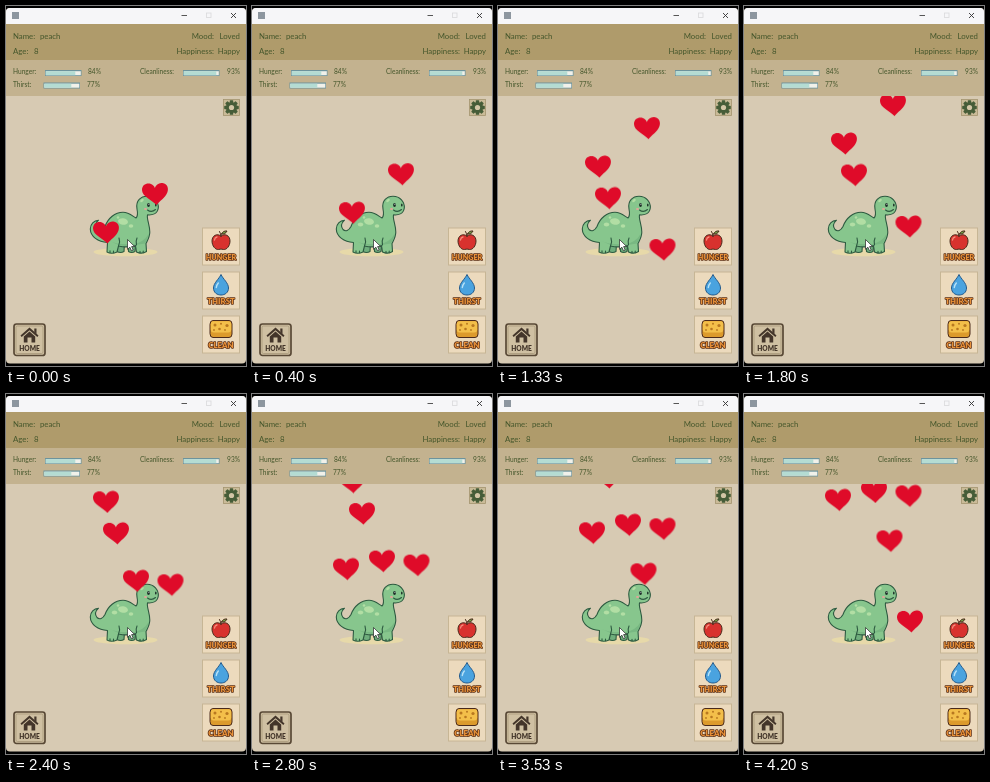
Animation of 240x360 px, one loop 4270 ms. Source, as an HTML page:

```html
<!DOCTYPE html>
<html lang="en">
<head>
<meta charset="utf-8">
<title>Virtual pet</title>
<style>
html, body { margin: 0; width: 100%; height: 100%; overflow: hidden; background: #000; }
svg { display: block; width: 100%; height: 100%; }
text { font-family: Lato, "Open Sans", sans-serif; fill: #44562b; }
.big { font-size: 7.8px; }
.small { font-size: 6.6px; }
.end { text-anchor: end; }
.label { font-weight: 900; text-anchor: middle; fill: #e9923a; stroke: #5b2e14; stroke-width: 1.5px; paint-order: stroke; stroke-linejoin: round; }
.line { stroke: #2d5a40; stroke-width: 1.1px; stroke-linejoin: round; stroke-linecap: round; }
.ink { stroke: #4a2a1c; stroke-width: 1px; stroke-linejoin: round; stroke-linecap: round; }

/* All hearts rise together; each one pops in at its own moment. */
.rise { animation: rise 4270ms steps(64) -6ms infinite; }
@keyframes rise { to { transform: translateY(-210.9px); } }
.pop { animation: 4270ms step-end infinite; }
.p1 { animation-name: pop1; }
.p2 { animation-name: pop2; }
.p3 { animation-name: pop3; }
.p4 { animation-name: pop4; }
.p5 { animation-name: pop5; }
.p6 { animation-name: pop6; }
@keyframes pop1 { 0% { opacity: 0; } 14.05%, to { opacity: 1; } }
@keyframes pop2 { 0% { opacity: 0; } 28.8%, to { opacity: 1; } }
@keyframes pop3 { 0% { opacity: 0; } 43.55%, to { opacity: 1; } }
@keyframes pop4 { 0% { opacity: 0; } 58.3%, to { opacity: 1; } }
@keyframes pop5 { 0% { opacity: 0; } 73.05%, to { opacity: 1; } }
@keyframes pop6 { 0% { opacity: 0; } 87.8%, to { opacity: 1; } }
</style>
</head>
<body>
<svg viewBox="0 0 240 360" preserveAspectRatio="none">
  <defs>
    <path id="heart" fill="#df0b29" d="M1.5 11.5C-3 6.500-13 3-13-3.500C-13-9-8-11-4-9.500C-2-8.800-.5-7-.2-5.500C1-8.800 4-11.200 7.500-10.500C12.500-9.800 14-5 12.300-1C10 4.500 5 7 1.500 11.500Z"/>
    <g id="bar">
      <rect width="36.500" height="6" fill="#6d939c"/>
      <rect x=".8" y="1.200" width="35" height="4" fill="#f1f1ea"/>
    </g>
    <rect id="card" x="196.500" y="0" width="37" height="37" fill="#ecdabd" stroke="#c7b695" stroke-width="1"/>
    <rect id="tooth" x="-1.700" y="-7.300" width="3.400" height="14.600" rx=".6"/>
    <clipPath id="yard"><rect y="90" width="240" height="267"/></clipPath>
  </defs>

  <!-- window -->
  <rect width="240" height="360" fill="#000"/>
  <rect y="2" width="240" height="355.500" rx="4" fill="#d7cab3"/>
  <path d="M0 18V6Q0 2 4 2H236Q240 2 240 6V18Z" fill="#f6f6f8"/>
  <rect x="6" y="6" width="7" height="7" fill="#8d969f"/>
  <g fill="none" stroke-width=".9">
    <path d="M175.500 9.500H181" stroke="#444"/>
    <rect x="200.500" y="7" width="4.500" height="4.500" stroke="#dcdcde"/>
    <path d="M225 7L230 12M230 7L225 12" stroke="#333"/>
  </g>

  <!-- status -->
  <rect y="18" width="240" height="36.500" fill="#af9b6b"/>
  <rect y="54" width="240" height="36" fill="#c3b28f"/>
  <g class="big">
    <text x="7" y="33">Name:</text><text x="34" y="33">peach</text>
    <text x="7" y="47.500">Age:</text><text x="28" y="47.500">8</text>
    <text class="end" x="208" y="33">Mood:</text><text class="end" x="234" y="33">Loved</text>
    <text class="end" x="208" y="47.500">Happiness:</text><text class="end" x="234" y="47.500">Happy</text>
  </g>
  <g class="small">
    <text x="7" y="68">Hunger:</text><text x="82" y="68">84%</text>
    <text x="7" y="81">Thirst:</text><text x="81" y="81">77%</text>
    <text class="end" x="168" y="68">Cleanliness:</text><text class="end" x="234" y="68">93%</text>
  </g>
  <use href="#bar" x="39" y="64"/><rect x="39.800" y="65.200" width="29.500" height="4" fill="#b4dcd3"/>
  <use href="#bar" x="37.500" y="76.500"/><rect x="38.300" y="77.700" width="27" height="4" fill="#b4dcd3"/>
  <use href="#bar" x="177" y="64"/><rect x="177.800" y="65.200" width="32.500" height="4" fill="#b4dcd3"/>

  <!-- settings -->
  <rect x="217.500" y="93.500" width="16" height="16" fill="#cabb98" stroke="#a3956f" stroke-width=".8"/>
  <g transform="translate(225.500 101.500)" fill="#465d38">
    <use href="#tooth"/><use href="#tooth" transform="rotate(45)"/>
    <use href="#tooth" transform="rotate(90)"/><use href="#tooth" transform="rotate(135)"/>
    <circle r="5.600"/><circle r="2.600" fill="#d3c6a6"/>
  </g>

  <!-- hunger -->
  <use href="#card" y="222"/>
  <path class="ink" fill="#d8322e" d="M215 230C211 227 206 229.500 206 235C206 240 209.500 244 212.500 243.500Q215 242.600 217.500 243.500C220.500 244 224 240 224 235C224 229.500 219 227 215 230Z"/>
  <path d="M208.500 234Q208.700 231.500 211 231" fill="none" stroke="#f58d7c" stroke-width="1.300" stroke-linecap="round"/>
  <path class="ink" d="M215 230Q214.800 227.500 213.500 225.500" fill="none"/>
  <path class="ink" stroke-width=".7" fill="#6fa545" d="M215.500 228Q217 224.500 221 225Q219.500 228.500 215.500 228Z"/>
  <text class="label" x="215" y="253.500" font-size="7.200">HUNGER</text>

  <!-- thirst -->
  <use href="#card" y="266"/>
  <path d="M215 268.500C217 273 222.500 277 222.500 282C222.500 286.500 219 289 215 289C211 289 207.500 286.500 207.500 282C207.500 277 213 273 215 268.500Z" fill="#4aa3df" stroke="#245a8c"/>
  <path d="M210.300 281.500Q210.600 279 212.300 277" fill="none" stroke="#b8e2f7" stroke-width="1.400" stroke-linecap="round"/>
  <text class="label" x="215" y="298" font-size="7.800">THIRST</text>

  <!-- clean -->
  <use href="#card" y="310"/>
  <path class="ink" fill="#dc9a2c" d="M204 318Q204 314.500 207 314.500H223Q226 314.500 226 318V328Q226 331.500 223 331.500H207Q204 331.500 204 328Z"/>
  <path fill="#f3bf4a" d="M204.800 318Q205 315.200 207.500 315.200H222.500Q225.200 315.200 225.200 318V324Q225 326.500 222.500 326.500H207.500Q205 326.500 204.800 324Z"/>
  <g fill="#b87820">
    <circle cx="209" cy="319" r="1.500"/><circle cx="215" cy="317.800" r="1"/><circle cx="221" cy="319.500" r="1.600"/>
    <circle cx="213.500" cy="323" r="1.300"/><circle cx="219" cy="324" r=".9"/><circle cx="208" cy="324" r=".9"/>
  </g>
  <text class="label" x="215" y="341.500" font-size="7.800">CLEAN</text>

  <!-- home -->
  <rect x="8" y="318" width="31" height="31.500" rx="2.500" fill="#cfc0a2" stroke="#594936" stroke-width="1.700"/>
  <rect x="10" y="320" width="27" height="27.500" rx="1.500" fill="none" stroke="#9d8c6d" stroke-width=".6"/>
  <g fill="#43352a">
    <path d="M23.500 321.500L32.500 329.500L31.300 331L23.500 324.200L15.700 331L14.500 329.500Z"/>
    <path d="M28.300 322.500H30.500V328L28.300 326Z"/>
    <path d="M17.800 330.500L23.500 325.500L29.200 330.500V336.500H25.500V331.500H21.500V336.500H17.800Z"/>
  </g>
  <text x="23.500" y="344.800" font-size="6.600" font-weight="900" text-anchor="middle" style="fill:#43352a">HOME</text>

  <!-- dinosaur -->
  <ellipse cx="119.500" cy="246" rx="32" ry="4.300" fill="#e7d9a9"/>
  <g class="line" fill="#6fae7c">
    <path d="M110 236L111 245.500Q114.500 247.500 118 245.500L118.500 237Z"/>
    <path d="M122 236L122.500 245.500Q125.500 247.500 129 245.500L130 236Z"/>
  </g>
  <path class="line" fill="#87c68d" d="M131 203C129.500 194.500 135 190.300 141 190.300C148 190.300 152.800 196 152.300 202C151.500 208 146 209.300 141.500 208.800C140.500 213 143.800 219 143.800 226C143.800 231 141.500 234.500 140 237.500L140.500 245.500Q136 248.500 130.500 246L129.500 239.500Q121 242 112.500 240L111 246Q105.500 248.500 101 246L101.500 236.500C92 236 84.500 230.500 84.300 223C84.300 218 88 214.500 92.500 214.200C89.500 217 88.500 220.500 91 223.500C93.500 226 97 224.500 99 220.500C102 212 109 206.300 117 206.300C123 206.300 127 210.500 130 212C132.200 210 131.700 206.500 131 203Z"/>
  <path fill="#72b37e" d="M102.500 234.500Q113 239.500 128 238Q138 236 142.600 228Q142 234 139 237.500L129.500 239Q121 241 112.500 239Z" opacity=".7"/>
  <g fill="#b2dea4">
    <ellipse cx="117" cy="215.500" rx="5" ry="3.200" transform="rotate(8 117 215.500)"/>
    <ellipse cx="108.500" cy="218.500" rx="2.700" ry="2"/>
    <ellipse cx="125" cy="220" rx="2.300" ry="1.700"/>
    <circle cx="112" cy="211.500" r="1.300"/>
    <ellipse cx="136" cy="194.500" rx="2" ry="1.300" transform="rotate(-35 136 194.500)"/>
  </g>
  <g class="line" fill="none" stroke-width=".8">
    <path d="M141.500 204Q145.500 207 149.500 203.500"/>
    <path d="M130.500 239Q129.500 235 131 232M112.500 240Q114.500 236 113 232"/>
    <path d="M104 246.500V244.800M107.500 246.800V245M134 247V245.200M137.200 246.800V245"/>
  </g>
  <ellipse cx="142.500" cy="199" rx="1.400" ry="1.900" fill="#1d2f28"/>
  <circle cx="142.900" cy="198.200" r=".5" fill="#fff"/>
  <ellipse cx="149.800" cy="199" rx=".8" ry="1.500" fill="#1d2f28"/>
  <ellipse cx="139.500" cy="203" rx="1.500" ry="1" fill="#e5a59a"/>

  <!-- hearts -->
  <g clip-path="url(#yard)">
    <g class="rise">
      <use href="#heart" x="149" y="187.500"/>
      <use href="#heart" x="100" y="226"/>
      <use class="pop p1" href="#heart" x="110" y="257.500"/>
      <use class="pop p2" href="#heart" x="164.500" y="309"/>
      <use class="pop p3" href="#heart" x="130" y="305"/>
      <use class="pop p4" href="#heart" x="94" y="313"/>
      <use class="pop p5" href="#heart" x="145.500" y="354"/>
      <use class="pop p6" href="#heart" x="166" y="434.500"/>
    </g>
  </g>

  <!-- pointer -->
  <path d="M121.500 233.500V243.300L123.900 241.200L125.500 244.800L127.200 244L125.600 240.600H128.700Z" fill="#fff" stroke="#222" stroke-width=".7" stroke-linejoin="round"/>
</svg>
</body>
</html>
```
